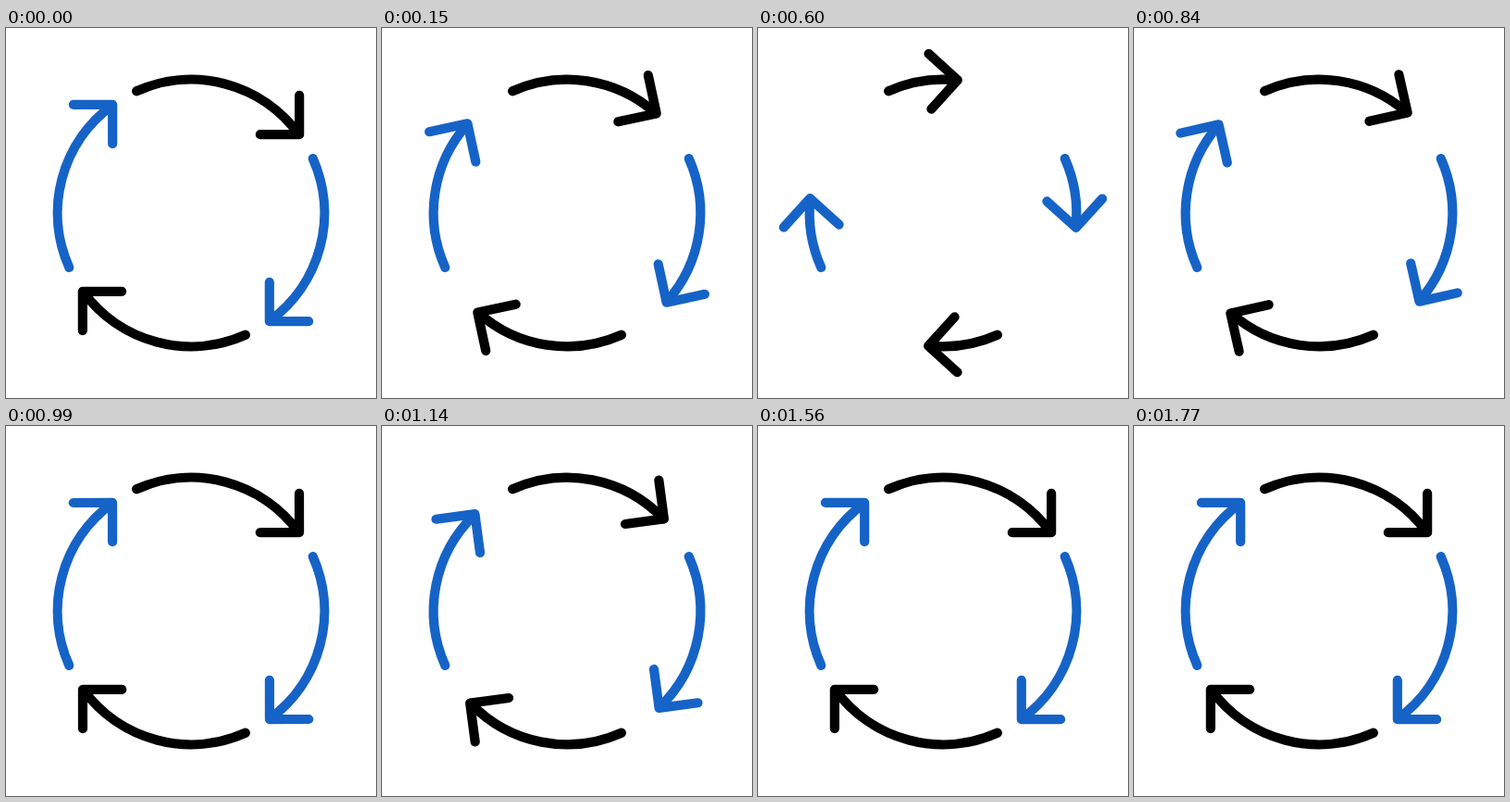
These frames come from a looping animation (400x400 px, 1830 ms). An HTML page with a canvas:

```html
<!DOCTYPE html>
<html lang="en">
<head>
<meta charset="utf-8">
<title>Cycling arrows</title>
<style>
  html, body { margin: 0; width: 100%; height: 100%; overflow: hidden; background: #fff; }
  canvas { display: block; width: 100vmin; height: 100vmin; }
</style>
</head>
<body>
<canvas id="stage" width="400" height="400"></canvas>
<script>
const ctx = document.getElementById('stage').getContext('2d');
const LOOP = 1830, STEP = 30;
const RADIUS = 144.3, ARM = 42.3;
const BLACK = '#000', BLUE = '#1663c7';
const rad = deg => deg * Math.PI / 180;
const TAIL = rad(-114.1), TIP = rad(-36.2);

// [time in ms, pull-back of the arrow tip in degrees]
const keys = [[0, 0], [490, -54.3], [1000, 0], [1200, -9.7], [1430, 0], [LOOP, 0]];

function pull(t) {
  const i = keys.findIndex(k => k[0] > t);
  const [t0, a] = keys[i - 1], [t1, b] = keys[i];
  const u = (t - t0) / (t1 - t0);
  return a + (b - a) * u * u * (3 - 2 * u);
}

function arrow(turn, color, shift) {
  ctx.save();
  ctx.translate(200, 200);
  ctx.rotate(turn * Math.PI / 2);
  ctx.strokeStyle = color;
  ctx.beginPath();
  ctx.arc(0, 0, RADIUS, TAIL, TIP + shift);
  ctx.stroke();

  // the head turns rigidly with the tip
  ctx.rotate(shift);
  ctx.translate(RADIUS * Math.cos(TIP) + 0.7, RADIUS * Math.sin(TIP) + 0.4);
  ctx.beginPath();
  ctx.moveTo(-ARM, 0);
  ctx.lineTo(0, 0);
  ctx.lineTo(0, -ARM);
  ctx.stroke();
  ctx.restore();
}

function draw() {
  const t = Math.min(1770, Math.floor(performance.now() % LOOP / STEP) * STEP);
  const shift = rad(pull(t));
  ctx.fillStyle = '#fff';
  ctx.fillRect(0, 0, 400, 400);
  ctx.lineWidth = 10.2;
  ctx.lineCap = ctx.lineJoin = 'round';
  for (let i = 0; i < 4; i++) arrow(i, i % 2 ? BLUE : BLACK, shift);
  requestAnimationFrame(draw);
}
draw();
</script>
</body>
</html>
```
